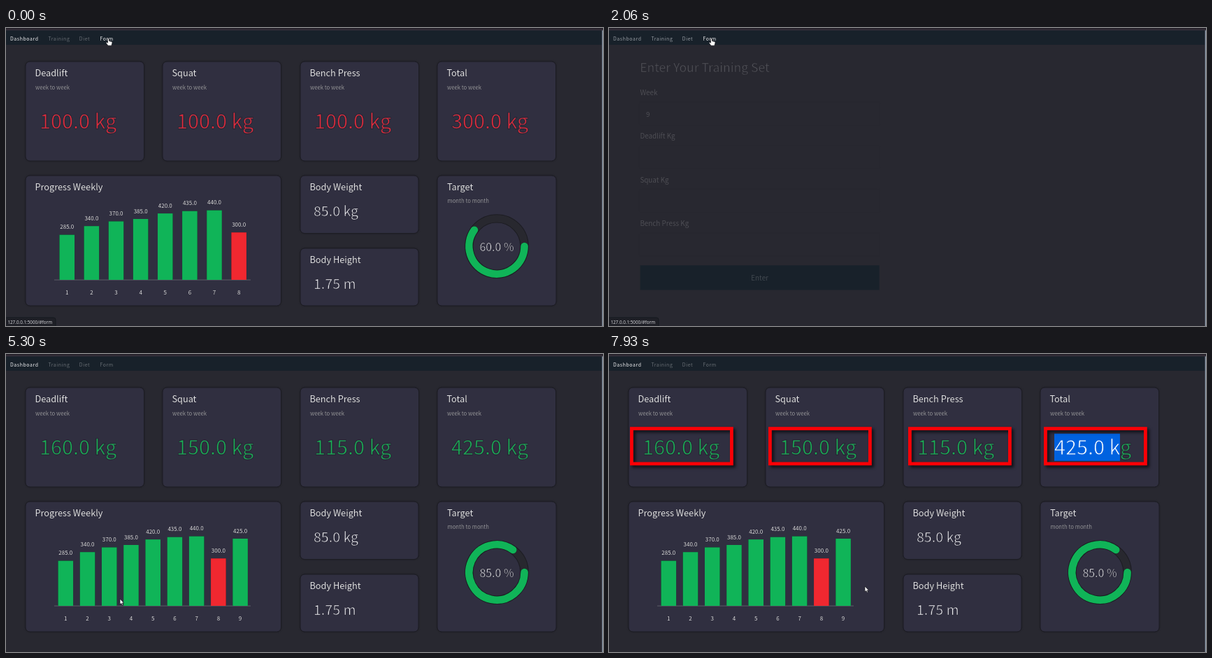
An HTML page that plays this animation: 854 by 426 pixels, repeating every 8 s.

```html
<!DOCTYPE html>
<html lang="en">
<head>
<meta charset="utf-8">
<title>Training dashboard</title>
<style>
  html, body { margin: 0; width: 100%; height: 100%; overflow: hidden; background: #282830; }
  svg { display: block; width: 100vw; height: 100vh; }
  text { font-family: "Noto Sans CJK JP", "Noto Sans CJK SC", "Noto Sans CJK", "Noto Sans", sans-serif; white-space: pre; }
  .shade { filter: drop-shadow(.8px .9px .6px rgba(0, 0, 0, .75)); }
  .card { fill: #302f40; stroke: #1d1d24; stroke-width: 1; filter: drop-shadow(0 0 1px #1c1c22); }
  .title { font-size: 12.75px; fill: #e4e4e6; }
  .sub { font-size: 7.75px; fill: #a0a0a8; }
  /* A stroke in the backdrop colour thins large glyphs to a light weight. */
  .big, .body, .pct { stroke: #302f40; }
  .big { font-size: 28.8px; stroke-width: .85; }
  .body { font-size: 19.6px; fill: #ececf0; stroke-width: .55; }
  .pct { font-size: 15.9px; fill: #ececf0; stroke-width: .45; text-anchor: middle; }
  .tick { font-size: 8px; fill: #e6e6ea; text-anchor: middle; }
  .nav { font-size: 6.9px; letter-spacing: .6px; }
  .head { font-size: 17.55px; fill: #f6f6f8; stroke: #282830; stroke-width: .45; }
  .label { font-size: 9.85px; fill: #ececee; }
  .status { font: 6.3px "Noto Sans", "Open Sans", sans-serif; fill: #d0d0d4; }
  .mark { fill: none; stroke: #fb0006; stroke-width: 4.8; stroke-linecap: round; stroke-linejoin: miter;
          filter: drop-shadow(3px 3px 2px rgba(0, 0, 0, .7)); }
  .cursor { fill: #fff; stroke: #15151a; stroke-width: .7; stroke-linejoin: round; }
</style>
</head>
<body>
<svg id="stage" viewBox="0 0 854 426" xmlns="http://www.w3.org/2000/svg"></svg>
<script>
const LOOP = 8000;
const GREEN = [16, 180, 88], RED = [240, 40, 48];
const FADED_GREEN = [24, 32, 58], FADED_RED = [58, 42, 48];
const LIFTS = ['Deadlift', 'Squat', 'Bench Press', 'Total'];
const COLS = [28, 224, 421, 617];
const WEEKS = [285, 340, 370, 385, 420, 435, 440, 300];

const rgb = c => `rgb(${c.map(Math.round)})`;
const clamp = v => Math.max(0, Math.min(1, v));
const ramp = (t, a, b) => clamp((t - a) / (b - a));
const mix = (a, b, p) => a.map((v, i) => v + (b[i] - v) * p);
const text = (cls, x, y, s, extra = '') => `<text class="${cls}" x="${x}" y="${y}" ${extra}>${s}</text>`;
const rect = (x, y, w, h, extra = '') => `<rect x="${x}" y="${y}" width="${w}" height="${h}" ${extra}/>`;
const card = (x, y, w, h) => rect(x, y, w, h, 'rx="6" class="card"');

// Position on a path of [time, x, y] stops, eased between stops.
function along(stops, t) {
  if (t <= stops[0][0]) return stops[0].slice(1);
  for (let i = 1; i < stops.length; i++) {
    const a = stops[i - 1], b = stops[i];
    if (t < b[0]) {
      const p = ramp(t, a[0], b[0]);
      return mix(a.slice(1), b.slice(1), p * p * (3 - 2 * p));
    }
  }
  return stops[stops.length - 1].slice(1);
}

function gauge(percent) {
  const a = percent / 100 * 2 * Math.PI, r = 39.6;
  const x = 702 + r * Math.cos(a), y = 312 + r * Math.sin(a);
  return `<path class="good-line" d="M${702 + r} 312A${r} ${r} 0 1 1 ${x} ${y}" fill="none"
    stroke="${rgb(GREEN)}" stroke-width="10.6" stroke-linecap="round"/>`;
}

function dashboard(id, lifts, color, weeks, percent) {
  const kg = [...lifts, lifts.reduce((a, b) => a + b)];
  const step = 281 / weeks.length, center = i => 69.7 + step * (i + .5);
  const top = v => 360 - v * .226;
  let cards = '', words = '', ink = '';

  COLS.forEach((x, i) => {
    cards += card(x, 48, 169.5, 142);
    words += text('title', x + 13.4, 69, LIFTS[i]) + text('sub', x + 14, 87.5, 'week to week')
      + text('big', x + 20, 144, kg[i].toFixed(1) + ' kg', `fill="${color}"`);
  });
  cards += card(28, 211, 365.5, 186) + card(421, 211, 169, 82.5) + card(421, 315, 169, 82) + card(617, 211, 170, 186)
    + '<circle cx="702" cy="312" r="39.6" fill="none" stroke="#1c1c22" stroke-width="12.4"/>'
    + '<circle cx="702" cy="312" r="39.6" fill="none" stroke="#28282f" stroke-width="10.4"/>'
    + rect(69, 359.6, 281, 1, 'fill="#5c5c68"');
  words += text('title', 41.4, 231.6, 'Progress Weekly')
    + text('title', 434.4, 231.6, 'Body Weight') + text('body', 440, 268.8, '85.0 kg')
    + text('title', 434.4, 335.8, 'Body Height') + text('body', 440, 372.8, '1.75 m')
    + text('title', 631, 231.6, 'Target') + text('sub', 631.5, 250, 'month to month')
    + text('pct', 702, 318.6, percent.toFixed(1) + ' %');
  weeks.forEach((v, i) => {
    const bad = v < weeks[i - 1];
    ink += rect(center(i) - 10.8, top(v), 21.6, 360 - top(v),
      `class="${bad ? 'bad' : 'good'}" fill="${rgb(bad ? RED : GREEN)}"`);
    words += text('tick', center(i), top(v) - 8.4, v.toFixed(1)) + text('tick', center(i), 381, i + 1);
  });
  return `<g id="${id}"><g class="cards">${cards}</g><g class="ink shade">${ink}${gauge(percent)}</g>
    <g class="words shade">${words}</g></g>`;
}

const FIELDS = ['Week', 'Deadlift Kg', 'Squat Kg', 'Bench Press Kg'];
const fieldY = i => 106 + i * 62.4;

function form() {
  let boxes = '', words = text('head', 44.2, 62.6, 'Enter Your Training Set');
  FIELDS.forEach((name, i) => {
    const y = fieldY(i);
    boxes += rect(44.4, y + .3, 342.4, 32.2, 'class="card" rx="1"');
    words += text('label', 44.4, y - 10, name) + text('label', 53, y + 21, i ? '' : '9', `id="val${i}"`);
  });
  words += text('label', 215.6, 361, 'Enter', 'text-anchor="middle"');
  return `<g id="form">${rect(44.6, 339.3, 342, 35.2, 'id="enter" fill="#18212a"')}
    <path id="ghost" d="M44 376V338.5H387.5V376" fill="none" stroke="#1c222e"/>
    <g id="boxes">${boxes}</g><g id="labels" class="shade">${words}</g>
    ${rect(44.5, 0, 342, 32, 'id="focus" rx="1.5" fill="none" stroke="#b8c4cc"')}
    ${rect(0, 0, .8, 11.5, 'id="caret" fill="#fff"')}</g>`;
}

const status = (id, w, s) => `<g id="${id}">${rect(-3, 414, w + 3, 16, 'rx="3" fill="#1f2027" stroke="#15191f"')}
  ${text('status', 2.4, 423.2, s)}</g>`;

const NAV = [['Dashboard', 6], ['Training', 60.4], ['Diet', 104.8], ['Form', 134.4]];
const MARKS = [0, 198, 398, 592];

const stage = document.getElementById('stage');
stage.innerHTML = `
  <clipPath id="picked">${rect(637, 113.8, 0, 39, 'id="pickClip"')}</clipPath>
  ${rect(0, 0, 854, 426, 'fill="#282830"')}
  ${rect(0, 0, 854, 2, 'fill="#26222b"')}${rect(0, 2, 854, 1.4, 'fill="#3b343e"')}
  ${rect(0, 3.4, 852.5, 20.6, 'fill="#18212a"')}${rect(852.7, 3.4, 1.3, 423, 'fill="#94a2b2"')}
  ${NAV.map(([s, x], i) => text('nav', x, 17.6, s, `id="nav${i}"`)).join('')}
  ${dashboard('before', [100, 100, 100], '#e42a3a', WEEKS, 60)}
  ${form()}
  ${dashboard('after', [160, 150, 115], '#18b054', [...WEEKS, 425], 85)}
  <g id="pick">${rect(637, 113.8, 0, 39, 'id="pickBox" fill="#0062e0"')}
    ${text('big', 637, 144, '425.0 kg', 'id="pickText" fill="#fff" style="stroke:#0062e0" clip-path="url(#picked)"')}</g>
  <g id="marks">${MARKS.map(x => `<path class="mark" pathLength="100" d="M${32.4 + x} 106.6v50.2h143v-50.2z"/>`).join('')}</g>
  ${status('link', 71, '127.0.0.1:5000/#form')}
  ${status('wait', 288, 'Waiting for 127.0.0.1…')}
  <g id="cursor">
    <path id="arrow" class="cursor" d="M0 0V8L1.9 6.4L3.1 9L4.5 8.4L3.3 5.9H5.6Z"/>
    <path id="hand" class="cursor" d="M-1 .6Q0-.8 1 .6V3.6L5 4.6Q5.6 5 5.4 6.6L4.4 10.2H-.6L-3.2 6.6Q-3.4 5-2 5.4L-1 6.4Z"/>
    <path id="beam" d="M-1.6-4.2H1.6M0-4.2V4.2M-1.6 4.2H1.6" fill="none" stroke="#e8e8ea" stroke-width=".9"/>
  </g>`;

const $ = id => document.getElementById(id);
const show = (id, on) => { $(id).style.display = on ? '' : 'none'; };
const fade = (el, v) => { el.style.opacity = v; };
const each = (sel, fn) => stage.querySelectorAll(sel).forEach(fn);

const ROUTE = [
  [2540, 146.5, 15], [2780, 137, 172], [3140, 135, 176], [3290, 135, 176], [3360, 135.3, 186],
  [3480, 137, 196], [4080, 159.3, 353], [5180, 159.3, 353], [5300, 163, 350], [5750, 163, 350],
  [6300, 561, 211], [6560, 566, 208], [6800, 637, 133], [6860, 637, 133], [7220, 735, 134],
  [7360, 716, 136], [7390, 716, 136], [7930, 366, 332]
];
const TYPING = [[], [2780, '160'], [2900, '150'], [3020, '115']];

function drawNav(t) {
  const dim = [104, 110, 116], mid = [150, 156, 162], lit = [238, 238, 240];
  const raised = mix(dim, mid, ramp(t, 1130, 1230) * (1 - ramp(t, 2560, 2720)));
  const home = t < 1130 || t >= 4470;
  NAV.forEach((_, i) => {
    let c = raised;
    if (i === 0) c = home ? lit : mix(lit, raised, ramp(t, 1130, 1230));
    if (i === 3) c = t < 4470 ? lit : dim;
    $('nav' + i).setAttribute('fill', rgb(c));
  });
}

function drawBefore(t) {
  show('before', t < 1500);
  const p = ramp(t, 1130, 1480), tint = Math.min(1, p / .8);
  const good = rgb(mix(GREEN, FADED_GREEN, tint)), bad = rgb(mix(RED, FADED_RED, tint));
  each('#before .cards, #before .words', g => fade(g, (1 - p) ** 1.4));
  each('#before .ink', g => fade(g, Math.min(1, (1 - p) * 5)));
  each('#before .good', b => b.setAttribute('fill', good));
  each('#before .bad', b => b.setAttribute('fill', bad));
  each('#before .good-line', b => b.setAttribute('stroke', good));
}

function drawForm(t) {
  show('form', t >= 2000 && t < 4470);
  const p = ramp(t, 1985, 2210), hover = ramp(t, 3990, 4080);
  fade($('labels'), p ** 1.5);
  fade($('boxes'), p ** 3);
  fade($('enter'), Math.min(1, p * 3) * (1 - hover));
  fade($('ghost'), hover);

  let active = 0, typed = '';
  for (let i = 1; i < 4; i++) {
    const [start, word] = TYPING[i];
    const s = word.slice(0, Math.max(0, Math.floor((t - start) / 30)));
    $('val' + i).textContent = s;
    if (t >= start) { active = i; typed = s; }
  }
  const focused = active && t < 4280;
  show('focus', focused);
  show('caret', focused && (t < 3600 || t >= 4000));
  if (focused) {
    const y = fieldY(active);
    const w = typed ? $('val' + active).getComputedTextLength() : 0;
    $('focus').setAttribute('y', Math.floor(y) + .5);
    $('caret').setAttribute('x', 53.2 + w);
    $('caret').setAttribute('y', y + 11);
  }
}

function drawPick(t, x) {
  const on = t >= 6860, el = $('pickText');
  show('pick', on);
  if (!on) return;
  const edge = t < 7220 ? x : 735;
  let w = 0;
  for (let n = 1; n <= 7; n++) {
    const next = el.getSubStringLength(0, n);
    if (637 + (w + next) / 2 > edge) break;
    w = next;
  }
  $('pickBox').setAttribute('width', w);
  $('pickClip').setAttribute('width', w);
}

function drawMarks(t) {
  const p = ramp(t, 5760, 6617);
  show('marks', p > 0);
  each('.mark', m => m.setAttribute('stroke-dasharray', p < 1 ? `${p * 100} 200` : 'none'));
}

function drawCursor(t, [x, y]) {
  const overText = (t > 2700 && t < 4080 && y < 330) || (t > 6740 && t < 7440);
  const kind = t < 2580 ? 'hand' : overText ? 'beam' : 'arrow';
  ['hand', 'beam', 'arrow'].forEach(k => show(k, k === kind));
  $('cursor').setAttribute('transform', `translate(${x} ${y})`);
}

function draw(t) {
  const pos = along(ROUTE, t);
  drawNav(t);
  drawBefore(t);
  drawForm(t);
  show('after', t >= 4470);
  drawPick(t, pos[0]);
  drawMarks(t);
  fade($('link'), 1 - ramp(t, 2580, 2720));
  fade($('wait'), ramp(t, 4280, 4400) * (1 - ramp(t, 4770, 4920)));
  drawCursor(t, pos);
}

const begin = performance.now();
function tick() {
  draw((performance.now() - begin) % LOOP);
  requestAnimationFrame(tick);
}
draw(0);
requestAnimationFrame(tick);
</script>
</body>
</html>
```
